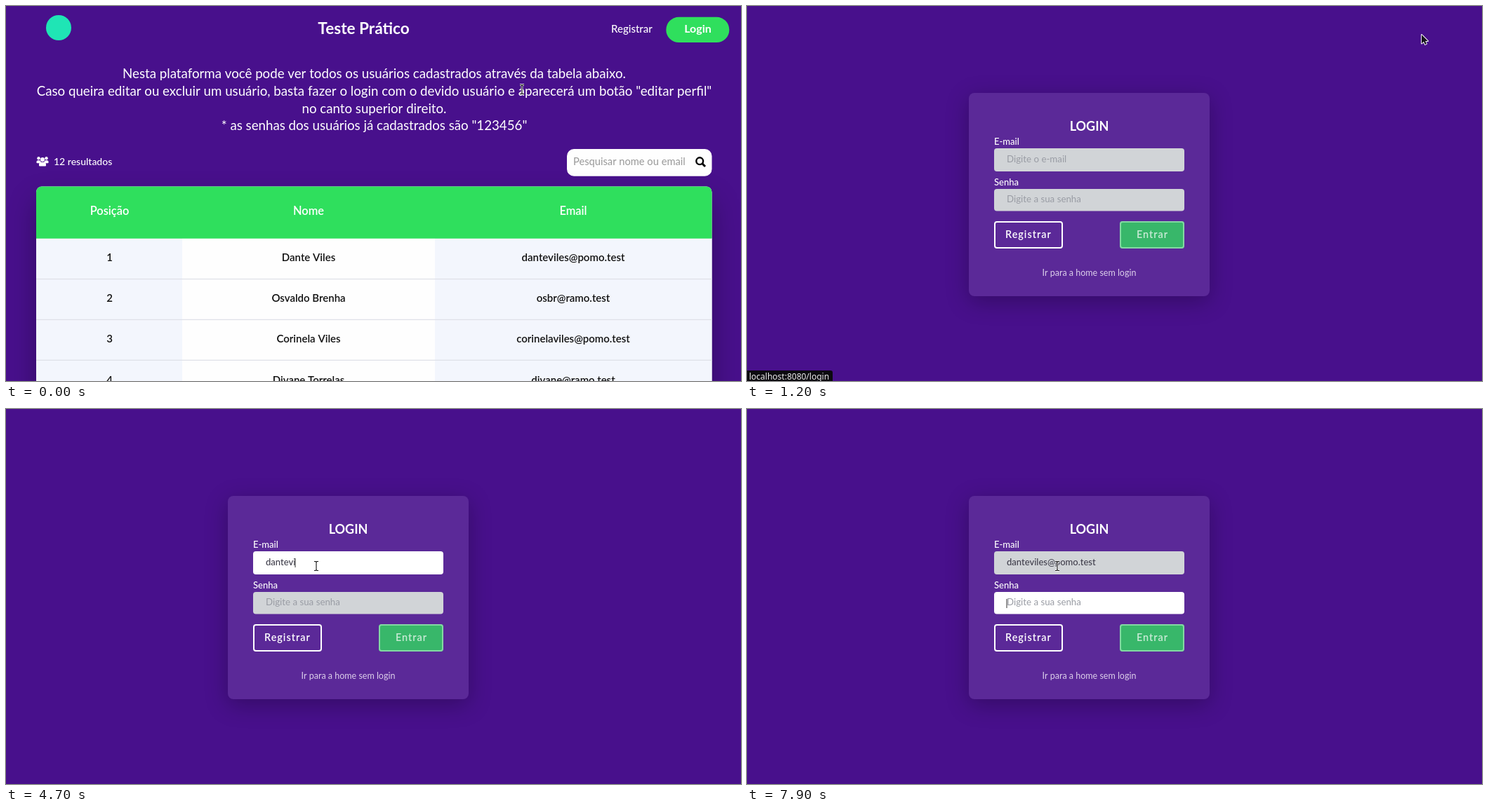
Animation of 1047x535 px, one loop 8000 ms. Source, as an HTML page with a canvas:

```html
<!DOCTYPE html>
<html lang="pt">
<head>
<meta charset="utf-8">
<title>Teste Prático</title>
<style>
  html, body { margin: 0; width: 100%; height: 100%; overflow: hidden; background: #48108c; }
  canvas { display: block; }
</style>
</head>
<body>
<canvas id="stage" width="1047" height="535"></canvas>
<script>
const ctx = document.getElementById('stage').getContext('2d');
const W = 1047, H = 535, LOOP = 8000;
const FONT = 'Lato, "Open Sans", sans-serif';
const PURPLE = '#48108c', GREEN = '#2fdf5d';
const OPEN_LOGIN = 1200, FOCUS_EMAIL = 2800, FOCUS_PASSWORD = 7900;

const EMAIL = 'danteviles@pomo.test';
const KEY_TIMES = [3800, 3800, 4000, 4200, 4500, 4700, 4700, 5100, 5200, 5300,
  5800, 6100, 6200, 6300, 6500, 7000, 7300, 7400, 7600, 7700];

const USERS = [
  ['Dante Viles', EMAIL],
  ['Osvaldo Brenha', 'osbr@ramo.test'],
  ['Corinela Viles', 'corinelaviles@pomo.test'],
  ['Divane Torrelas', 'divane@ramo.test'],
];

// time, x, y, cursor
const POINTER = [
  [0, 735, 119, beam], [300, 790, 128, beam], [400, 849, 108, beam],
  [600, 876, 93, arrow], [700, 915, 68, arrow], [800, 944, 48, hand],
  [900, 958, 42, hand], [1000, 963, 40, hand], [1200, 960, 40, arrow],
  [1500, 860, 76, arrow], [1600, 744, 111, arrow], [1800, 742, 111, arrow],
  [2400, 589, 66, arrow], [2500, 545, 105, arrow], [2600, 490, 160, arrow],
  [2700, 452, 205, beam], [2800, 442, 225, beam], [3000, 442, 224, beam],
];

function text(str, x, y, size, { weight = 400, color = '#fff', align = 'left', spacing = 0, font = FONT } = {}) {
  ctx.font = `${weight} ${size}px ${font}`;
  ctx.letterSpacing = spacing + 'px';
  ctx.textAlign = align;
  ctx.fillStyle = color;
  ctx.fillText(str, x, y);
}

const centered = (str, x, y, size, style) => text(str, x, y, size, { align: 'center', ...style });

function box(x, y, w, h, r, fill, border) {
  ctx.beginPath();
  ctx.roundRect(x, y, w, h, r);
  if (fill) { ctx.fillStyle = fill; ctx.fill(); }
  if (border) {
    ctx.beginPath();
    ctx.roundRect(x + 1, y + 1, w - 2, h - 2, r - 1);
    ctx.strokeStyle = border;
    ctx.lineWidth = 2;
    ctx.stroke();
  }
}

function rect(x, y, w, h, color) {
  ctx.fillStyle = color;
  ctx.fillRect(x, y, w, h);
}

function disc(x, y, r, color) {
  ctx.beginPath();
  ctx.arc(x, y, r, 0, Math.PI * 2);
  ctx.fillStyle = color;
  ctx.fill();
}

function shadowBox(x, y, w, h, r, fill, offset, blur, alpha) {
  ctx.save();
  ctx.shadowColor = `rgba(0,0,0,${alpha})`;
  ctx.shadowBlur = blur;
  ctx.shadowOffsetY = offset;
  box(x, y, w, h, r, fill);
  ctx.restore();
}

function outlined(path, fill, line, width) {
  ctx.lineJoin = 'round';
  ctx.lineWidth = width;
  ctx.strokeStyle = line;
  ctx.stroke(path);
  ctx.fillStyle = fill;
  ctx.fill(path);
}

function arrow() {
  outlined(new Path2D('M1 1V13.5L4 10.8L6 15L8 14L6.2 10H10Z'), '#16131c', '#fff', 1.8);
}

function hand() {
  outlined(new Path2D('M-2 1.2Q-.6 -.4 .6 1.2V5.5L5 6.4Q6.4 7 6.2 8.5L5.2 13.5H-1.6L-4.8 8.8Q-4.6 7 -2 8.6Z'),
    '#fff', '#222', 1.6);
}

function beam() {
  const path = new Path2D('M-3 -6.5H-1L0 -5.5L1 -6.5H3M0 -5.5V5.5M-3 6.5H-1L0 5.5L1 6.5H3');
  for (const [color, width] of [['rgba(255,255,255,.85)', 2.8], ['#111', 1.1]]) {
    ctx.strokeStyle = color;
    ctx.lineWidth = width;
    ctx.stroke(path);
  }
}

function drawPointer(t) {
  const [, x, y, draw] = POINTER.findLast(p => p[0] <= t);
  ctx.save();
  ctx.translate(x, y);
  draw();
  ctx.restore();
}

function statusBar() {
  box(-4, 520, 126, 20, 3, '#0c0a10');
  text('localhost:8080/login', 3, 533, 12, { color: '#eee', font: '"Noto Sans", sans-serif' });
}

function person(x, y, r, w, h) {
  disc(x, y, r, '#fff');
  box(x - w / 2, y + r + 0.8, w, h, [w / 3, w / 3, 1, 1], '#fff');
}

function searchIcon() {
  ctx.strokeStyle = '#000';
  ctx.lineWidth = 2.4;
  ctx.beginPath();
  ctx.arc(988.2, 221.2, 4.9, 0, Math.PI * 2);
  ctx.stroke();
  ctx.lineWidth = 3;
  ctx.beginPath();
  ctx.moveTo(991.8, 224.8);
  ctx.lineTo(996, 229);
  ctx.stroke();
}

function drawTable() {
  const cols = [[43, 208, '#f3f6fd'], [251, 360, '#fefefe'], [611, 394.5, '#f3f6fd']];
  const centers = [147.5, 431, 808];
  shadowBox(43, 257.5, 962.5, 400, 8, '#fff', 20, 40, 0.3);
  for (const [x, w, color] of cols) rect(x, 331, w, 204, color);
  box(43, 257.5, 962.5, 74.3, [8, 8, 0, 0], GREEN);
  ['Posição', 'Nome', 'Email'].forEach((label, i) =>
    centered(label, centers[i], 298, 16.4, { weight: 600 }));
  USERS.forEach((user, row) => {
    const y = 332 + row * 57.9;
    if (row) rect(43, y - 1, 962.5, 1.3, '#dfe1e8');
    [row + 1, ...user].forEach((cell, i) =>
      centered(cell, centers[i], 364 + row * 58.2, 15, { weight: 600, color: '#111' }));
  });
}

function drawHome(t) {
  disc(75, 31, 18, '#1fe5b5');
  centered('Teste Prático', 509.5, 40, 22.6, { weight: 700 });
  text('Registrar', 862, 38, 15, { weight: 500 });

  const hover = Math.min(1, Math.max(0, (t - 800) / 200));
  const mix = (a, b) => Math.round(a + (b - a) * hover);
  box(940.3, 15.8, 90, 36.3, 18.1, `rgb(${mix(47, 31)},${mix(223, 146)},${mix(93, 64)})`);
  centered('Login', 985.5, 38, 16, { weight: 700 });

  [
    'Nesta plataforma você pode ver todos os usuários cadastrados através da tabela abaixo.',
    'Caso queira editar ou excluir um usuário, basta fazer o login com o devido usuário e aparecerá um botão "editar perfil"',
    'no canto superior direito.',
    '* as senhas dos usuários já cadastrados são "123456"',
  ].forEach((line, i) => centered(line, 524.5, 103 + i * 24.8, 18.7));

  person(46.5, 217.2, 2.2, 6, 4);
  person(57.5, 217.2, 2.2, 6, 4);
  person(52, 219, 3, 10, 5.6);
  text('12 resultados', 68, 227, 14, { weight: 500 });

  box(799, 204, 206.5, 38.7, 10, '#fefefe');
  text('Pesquisar nome ou email', 808, 227, 14.7, { color: '#999' });
  searchIcon();
  drawTable();
}

function field(y, h, value, hint, focused, caretOn) {
  const base = y + 20, size = value ? 13 : 13.3;
  box(352, y, 271, h, 4, focused ? '#fff' : '#d1d4d7');
  text(value || hint, 370, base - (h < 33 ? 0.7 : 0), size,
    { color: value ? '#403f4c' : '#999ca4', weight: value ? 500 : 400 });
  if (focused && caretOn) {
    const end = value ? ctx.measureText(value).width : 0;
    rect(Math.round(370 + end) - 0.5, y + 10, 1, 13, '#333');
  }
}

function drawLogin(t) {
  shadowBox(316, 124, 343, 290, 8, '#5b2998', 8, 32, 0.27);
  centered('LOGIN', 487.5, 177.5, 18, { weight: 700 });

  const typed = EMAIL.slice(0, KEY_TIMES.filter(k => k <= t).length);
  const onEmail = t >= FOCUS_EMAIL && t < FOCUS_PASSWORD;
  const blinkOff = t >= 3400 && t < 3800;
  text('E-mail', 352, 198, 13, { weight: 500 });
  field(203, 33, typed, 'Digite o e-mail', onEmail, !blinkOff);
  text('Senha', 352, 256, 13, { weight: 500 });
  field(261, 31.5, '', 'Digite a sua senha', t >= FOCUS_PASSWORD, true);

  box(352, 307, 98, 39, 4, null, '#fff');
  text('Registrar', 368, 331, 14.4, { weight: 600, spacing: 1 });
  box(531, 307, 92, 39, 4, '#38b76a', '#83d8a3');
  text('Entrar', 555, 331, 14.4, { weight: 600, spacing: 1, color: '#c9ebd6' });
  centered('Ir para a home sem login', 487.5, 385, 12.5, { color: '#dccfea' });
}

function frame(now) {
  const t = now % LOOP;
  rect(0, 0, W, H, PURPLE);
  if (t < OPEN_LOGIN) drawHome(t);
  else drawLogin(t);
  if (t >= 900 && t < 1600) statusBar();
  drawPointer(t);
  requestAnimationFrame(frame);
}

requestAnimationFrame(frame);
</script>
</body>
</html>
```
